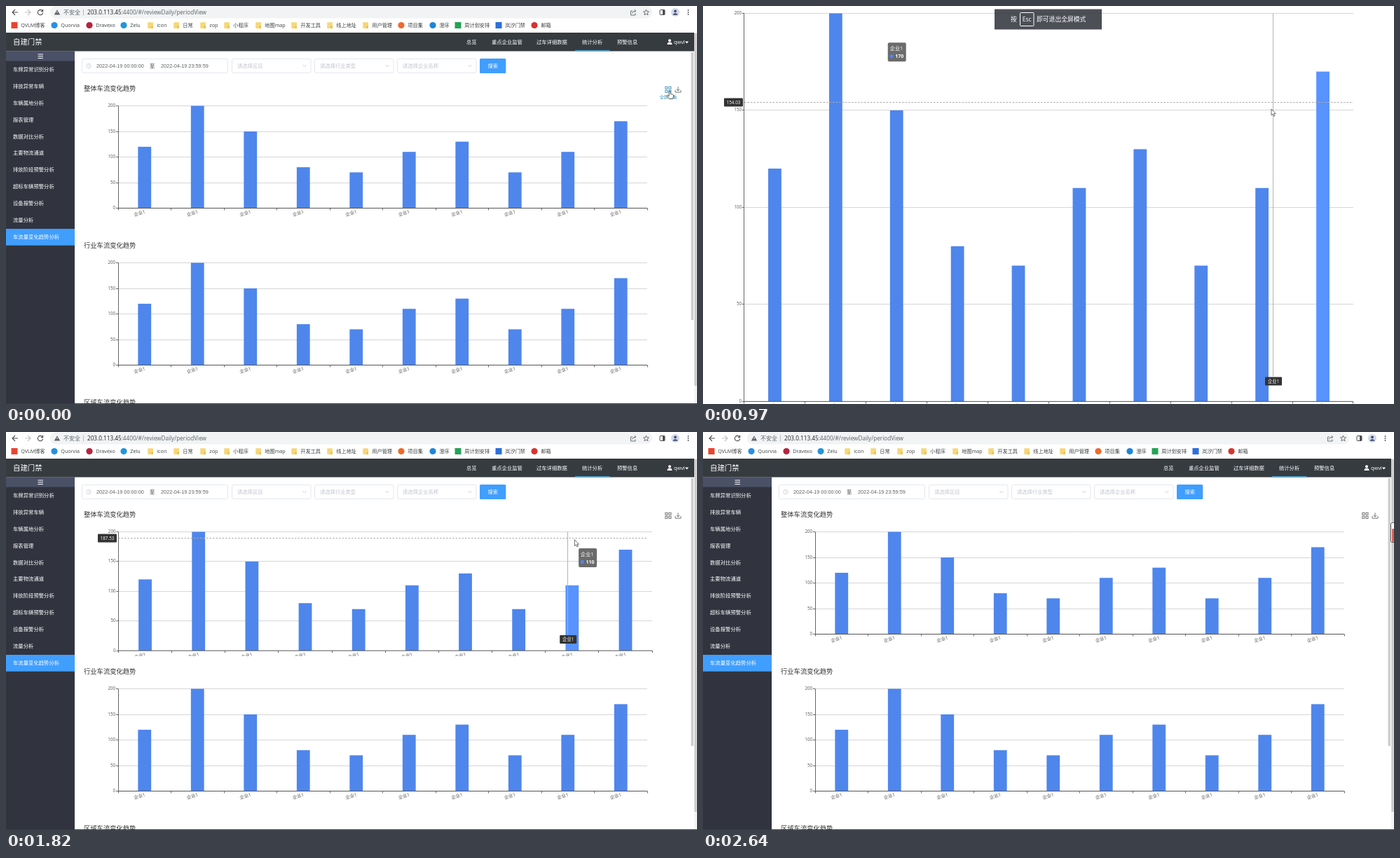
Animation, 986 px wide and 568 px high, one loop 3.04 s. Source, as an HTML page with a canvas:

```html
<!DOCTYPE html>
<html lang="zh">
<head>
<meta charset="utf-8">
<title>车流量变化趋势</title>
<style>
html, body { margin: 0; width: 100%; height: 100%; overflow: hidden; background: #fff; }
canvas { display: block; width: 986px; height: 568px; }
</style>
</head>
<body>
<canvas id="stage" width="986" height="568"></canvas>
<script>
const ctx = document.getElementById('stage').getContext('2d', { alpha: false });
const UI = '"Open Sans", "Noto Sans CJK SC", "Noto Sans CJK", sans-serif';
const INPUT = '"Liberation Sans", "Noto Sans CJK SC", sans-serif';
const BLUE = '#409eff', TAU = Math.PI * 2;

// Timeline in ms
const LOOP = 3040, ENTER = 690, HOVER = 900, EXIT = 1460, SHRINK = 1636, LEAVE = 2310, GONE = 2480;

const VALUES = [120, 200, 150, 80, 70, 110, 130, 70, 110, 170];
const MENU = ['车牌异常识别分析', '排放异常车辆', '车辆属地分析', '报表管理', '数据对比分析', '主要物流通道',
  '排放阶段预警分析', '超标车辆预警分析', '设备报警分析', '流量分析', '车流量变化趋势分析'];
const NAV = [[657, '总览'], [693, '重点企业监管'], [757, '过车详细数据'], [822, '统计分析'], [872, '预警信息']];
const BOOKMARKS = [
  [12, 'QVLM博客', 'square', '#e8452f'], [69, 'Quorvia', 'circle', '#2a8fe0'],
  [119, 'Dravexo', 'circle', '#b3243d'], [168, 'Zelu', 'circle', '#2196d8'],
  [206, 'icon'], [243, '日常'], [281, 'zop'], [315, '小程序'], [360, '地图map'],
  [411, '开发工具'], [462, '线上地址'], [513, '用户管理'],
  [564, '项目集', 'circle', '#ee6a2c'], [609, '澄序', 'circle', '#1d86d8'],
  [645, '周计划安排', 'square', '#23a455'], [703, '岚汐门禁', 'square', '#2c6fe0'],
  [754, '邮箱', 'circle', '#d5342f']];

const clamp = u => Math.min(1, Math.max(0, u));
const mix = (a, b, u) => a + (b - a) * u;
const outPow = (u, n) => 1 - (1 - clamp(u)) ** n;
const outExpo = u => u >= 1 ? 1 : 1 - 2 ** (-10 * clamp(u));

// Linear keyframes: [time, ...values]
function track(t, keys) {
  if (t <= keys[0][0]) return keys[0].slice(1);
  for (let i = 1; i < keys.length; i++) {
    const a = keys[i - 1], b = keys[i];
    if (t <= b[0]) return a.slice(1).map((v, k) => mix(v, b[k + 1], (t - a[0]) / (b[0] - a[0])));
  }
  return keys[keys.length - 1].slice(1);
}

// Drawing helpers; text is centred vertically on y
function text(s, x, y, size, color, align = 'left', font = UI, weight = '') {
  ctx.font = `${weight} ${size}px ${font}`;
  ctx.textAlign = align;
  ctx.fillStyle = color;
  ctx.fillText(s, x, y + size * 0.36);
}
function rect(x, y, w, h, color) {
  ctx.fillStyle = color;
  ctx.fillRect(x, y, w, h);
}
function round(x, y, w, h, r, fill, stroke) {
  ctx.beginPath();
  ctx.roundRect(x, y, w, h, r);
  if (fill) { ctx.fillStyle = fill; ctx.fill(); }
  if (stroke) { ctx.strokeStyle = stroke; ctx.lineWidth = 1; ctx.stroke(); }
}
function disc(x, y, r, color) {
  ctx.beginPath();
  ctx.arc(x, y, r, 0, TAU);
  ctx.fillStyle = color;
  ctx.fill();
}
function path(d, x, y, stroke, width = 1, fill) {
  ctx.save();
  ctx.translate(x, y);
  const p = new Path2D(d);
  if (fill) { ctx.fillStyle = fill; ctx.fill(p); }
  if (stroke) { ctx.strokeStyle = stroke; ctx.lineWidth = width; ctx.stroke(p); }
  ctx.restore();
}
const line = (x1, y1, x2, y2, color, width = 1) => path(`M${x1} ${y1}L${x2} ${y2}`, 0, 0, color, width);

function browserBar() {
  rect(0, 0, 986, 38, '#fff');
  path('M4 0H-4M0-4L-4 0L0 4', 13, 9, '#4a4d51', 1.1);
  path('M-4 0H4M0-4L4 0L0 4', 31, 9, '#bfc1c4', 1.1);
  path('M2.8-2.4A3.7 3.7 0 1 0 3.7.6M3.6-4.2V-1.4H.8', 49, 9, '#4a4d51', 1.1);
  round(63, 0.5, 859, 17, 8.5, '#f1f3f4');
  path('M0-3.8L4.2 3.6H-4.2Z', 73, 9, null, 1, '#5f6368');
  rect(72.6, 7.6, 0.9, 2.4, '#fff');
  text('不安全', 82, 9, 8, '#5f6368');
  rect(110, 4.5, 1, 9, '#b8bbbe');
  const host = '203.0.113.45';
  text(host, 116, 9, 8.2, '#202124');
  text(':4400/#/reviewDaily/periodView', 116 + ctx.measureText(host).width, 9, 8.2, '#5f6368');
  path('M-1-2H-3.5V4H3V1.5M-1.5 1.5Q-1-2 3.5-2M1.7-4L3.8-2L1.7 0', 895, 9, '#5f6368', 0.9);
  path('M0-4L1.1-1.2L4-1L1.8.9L2.5 3.8L0 2.2L-2.5 3.8L-1.8.9L-4-1L-1.1-1.2Z', 913.5, 9, '#5f6368', 0.9);
  round(933, 5.5, 7, 7, 1, '#fff', '#4a4d51');
  rect(937, 5.5, 3, 7, '#4a4d51');
  disc(955, 9, 6, '#d3d9ea');
  disc(955, 7.3, 1.9, '#3f4a6b');
  path('M-3.3 0Q-3-2.6 0-2.6Q3-2.6 3.3 0Z', 955, 12.8, null, 1, '#3f4a6b');
  for (const dy of [-3, 0, 3]) disc(973.5, 9 + dy, 0.9, '#4a4d51');

  for (const [x, label, shape, color] of BOOKMARKS) {
    if (shape === 'circle') disc(x, 27.5, 4.6, color);
    else if (shape === 'square') rect(x - 4.5, 23, 9, 9, color);
    else {
      round(x - 3.8, 23.2, 7.8, 8.8, 1, '#f7d777');
      rect(x + 1.2, 28.5, 2.8, 3.5, '#efc24f');
    }
    text(label, x + 9.3, 27.8, 7.2, '#3c4043');
  }
}

function shell(hover) {
  rect(0, 38, 982, 26.5, '#363b40');
  text('自建门禁', 10, 51, 10.4, '#fff');
  for (const [x, label] of NAV) text(label, x, 51.3, 7.3, '#fff');
  rect(812, 63, 49.5, 1.5, '#4fa3cf');
  disc(947, 49.2, 2, '#fff');
  path('M-3.5 0Q-3.5-3.6 0-3.6Q3.5-3.6 3.5 0Z', 947, 55, null, 1, '#fff');
  text('qwvl', 953, 51.3, 7.3, '#fff');
  path('M-2.6-1.4H2.6L0 1.6Z', 971.5, 51.8, null, 1, '#fff');

  rect(0, 64.5, 98, 504, '#31343f');
  rect(0, 65, 98, 13.5, '#4a5066');
  for (const dy of [-2.8, 0, 2.8]) rect(45.5, 71.2 + dy, 7.5, 1, '#fff');
  rect(0, 318, 98, 23.7, BLUE);
  MENU.forEach((label, i) => text(label, 10, 90.2 + 23.93 * i, 7.35, '#fff'));

  round(108.5, 75.5, 208, 20, 2, '#fff', '#e4e7ed');
  path('M3.2 0A3.2 3.2 0 1 1-3.2 0A3.2 3.2 0 1 1 3.2 0M0-2V.4H1.8', 118, 85.5, '#c0c4cc', 0.7);
  text('2022-04-19 00:00:00', 129, 85.2, 7.3, '#606266', 'left', INPUT);
  text('至', 205, 85.2, 7.3, '#303133');
  text('2022-04-19 23:59:59', 221, 85.2, 7.3, '#606266', 'left', INPUT);
  [[322, '请选择区目'], [440, '请选择行业类型'], [558, '请选择企业名称']].forEach(([x, label]) => {
    round(x + 0.5, 75.5, 112.5, 20, 2, '#fff', '#e4e7ed');
    text(label, x + 8, 85.2, 7.3, '#c0c4cc');
    path('M-2.7-1.3L0 1.4L2.7-1.3', x + 104, 85.3, '#c0c4cc', 0.8);
  });
  round(676, 75, 37.3, 21, 1.5, BLUE);
  text('搜索', 694.7, 85.2, 7.3, '#fff', 'center');

  ['整体车流变化趋势', '行业车流变化趋势', '区域车流变化趋势'].forEach((title, i) =>
    text(title, 111, 118 + 223.6 * i, 9.3, '#333'));

  const tone = hover ? '#3c8fb8' : '#666';
  for (const dx of [-4.2, 0.9]) for (const dy of [-4.2, 0.9]) {
    ctx.strokeStyle = tone;
    ctx.lineWidth = 0.9;
    ctx.strokeRect(945 + dx, 119.3 + dy, 3.1, 3.1);
  }
  path('M0-4V1.8M-2.3-.5L0 1.8L2.3-.5M-4 .8V3.8H4V.8', 959, 119.3, '#666', 0.9);
  if (hover) text('全屏查看', 945, 129.5, 6.2, tone, 'center');

  rect(977.5, 66, 3.5, 382, '#cdcdcd');
  rect(982, 38, 4, 530, '#f4f4f4');
  rect(982.3, 39, 3.4, 503, '#cbcbcb');
  rect(0, 567, 986, 1, '#3a3a3a');
}

// Chart in its container's coordinates
function chart(grid, active = -1) {
  const { left, width, top, height } = grid;
  const base = top + height, pitch = width / VALUES.length;
  for (let v = 0; v <= 200; v += 50) {
    const y = Math.round(base - v / 200 * height - 0.5) + 0.5;
    if (v) line(left, y, left + width, y, '#d6d6d6');
    line(left - 3, y, left, y, '#666');
    text(v, left - 4, y - 0.4, 6.2, '#555', 'right');
  }
  VALUES.forEach((v, i) => {
    const x = left + pitch * (i + 0.5), h = v / 200 * height;
    rect(x - 9.4, base - h, 18.8, h, i === active ? '#5893ff' : '#4f86ec');
    ctx.save();
    ctx.translate(x + 0.5, base + 4.6);
    ctx.rotate(-0.3);
    text('企业1', 0, 0, 6.4, '#555', 'right');
    ctx.restore();
  });
  const axisX = Math.round(left - 0.5) + 0.5;
  line(axisX, top, axisX, base + 3, '#666');
  line(left, base, left + width, base, '#555');
  for (let i = 1; i <= VALUES.length; i++) {
    const x = Math.round(left + pitch * i - 0.5) + 0.5;
    line(x, base, x, base + 3, '#666');
  }
}
const mainGrid = f => ({ left: 51 + 8 * f, width: 755 + 114 * f, top: 10.5, height: 146 + 408 * f });

function badge(s, x, y, w) {
  round(x, y, w, 12, 1, '#333');
  text(s, x + w / 2, y + 5.8, 6.3, '#fff', 'center');
}

function pointerState(t) {
  if (t < HOVER || t >= LEAVE) return null;
  if (t < SHRINK) {
    const p = outExpo((t - HOVER) / 200), q = outPow((t - 940) / 400, 5);
    return {
      grid: mainGrid(1), active: 9, x: mix(87, 884, p), bottom: mix(156.5, 564.5, p),
      y: track(t, [[970, 137.834], [1250, 147]])[0],
      tip: t >= 940 && [817 * q, 162 * q]
    };
  }
  const p = outExpo((t - 1632) / 200), q = outPow((t - 1635) / 400, 5);
  const [tx, ty] = track(t, [[2030, 812, 160], [2070, 815, 162], [2200, 838, 170]]);
  return {
    grid: mainGrid(0), active: 8, x: mix(884, 692.4, p), bottom: mix(564.5, 156.5, p),
    y: track(t, [[1660, 16.756], [2070, 24.056]])[0],
    tip: [mix(926, tx, q) - 109, mix(294, ty, q) - 132]
  };
}

function crosshair({ grid, x, y, bottom }) {
  const { left, width, top, height } = grid;
  const rowY = Math.round(y - 0.5) + 0.5, colX = Math.round(x - 0.5) + 0.5;
  line(colX, top, colX, bottom, '#b2b2b2');
  ctx.setLineDash([2.5, 2]);
  line(left, rowY, left + width, rowY, '#aaa');
  ctx.setLineDash([]);
  badge((200 - (y - top) / height * 200).toFixed(2), left - 29, rowY - 6, 27);
  badge('企业1', x - 11.5, bottom + 1, 24);
}

function tooltip([x, y], value) {
  round(x, y, 26, 27, 2, 'rgba(50,50,50,.72)');
  text('企业1', x + 3, y + 8, 7.2, '#fff');
  disc(x + 5.3, y + 19.3, 2.6, '#4f86ec');
  text(value, x + 10.5, y + 19.2, 7, '#fff', 'left', UI, 'bold');
}

function toast(t) {
  const u = clamp((t - ENTER) / 140);
  if (!u) return;
  ctx.save();
  ctx.translate(492.5, 19);
  ctx.scale(mix(0.96, 1, u), mix(0.96, 1, u));
  rect(-76.5, -14.5, 153, 29, `rgba(32,36,44,${0.8 * u})`);
  text('按', -53.5, 0.3, 8.8, '#fff');
  round(-40, -9.5, 19.5, 19, 1, null, '#fff');
  text('Esc', -30.3, 0.3, 8.6, '#fff', 'center');
  text('即可退出全屏模式', -16.5, 0.3, 8.8, '#fff');
  ctx.restore();
}

function cursor(t) {
  if (t >= GONE) return;
  const [x, y] = track(t, [[650, 947, 121], [790, 947, 121], [970, 811, 147], [1460, 802, 150],
    [1680, 802, 150], [2070, 828, 160], [2270, 900, 300], [2470, 985, 562]]);
  if (t < 650 || (t >= ENTER && t < 800))
    path('M-1 1Q0-.6 1 1V4.5L4.5 5.3Q5.7 5.7 5.5 7L4.6 11.5H-.6L-3.7 7.6Q-3.5 6.2-2.2 6.9L-1 7.8Z', x, y, '#333', 0.8, '#fff');
  else
    path('M0 0V9L2.1 7.2L3.5 10.3L5 9.6L3.6 6.6H6.2Z', t < ENTER ? x - 3 : x, y, '#333', 0.7, '#fff');
}

function sideWidget() {
  round(981.5, 129.5, 9, 28, 2, '#fff', '#555');
  rect(983, 138, 3, 19, '#e5736e');
  rect(984, 139, 1, 17, '#c93a35');
}

function draw(t) {
  const full = t >= ENTER && t < EXIT;
  const pointer = pointerState(t);
  const grow = t < SHRINK ? outPow((t - ENTER) / 300, 3) : 1 - outPow((t - SHRINK) / 300, 3);
  rect(0, 0, 986, 568, '#fff');
  if (!full) {
    browserBar();
    shell(t < ENTER);
    const wide = t < EXIT ? 0 : 1 - outPow((t - EXIT) / 300, 3);
    ctx.save();
    ctx.beginPath();
    ctx.rect(109, 356, 857.5, 188);
    ctx.clip();
    ctx.translate(109, 356);
    chart({ left: 51, width: 755 + 114 * wide, top: 10.5, height: 146 });
    ctx.restore();
  }
  ctx.save();
  if (!full) ctx.translate(109, 132);
  ctx.save();
  if (!full) {
    ctx.beginPath();
    ctx.rect(0, 0, 857.5, 188);
    ctx.clip();
  }
  chart(mainGrid(grow), pointer ? pointer.active : -1);
  if (pointer) crosshair(pointer);
  ctx.restore();
  if (pointer && pointer.tip) tooltip(pointer.tip, VALUES[pointer.active]);
  ctx.restore();
  if (full) toast(t);
  if (t >= 1940) sideWidget();
  cursor(t);
}

function step(t) {
  if (t < 650) return 0;
  const base = t < 1060 ? 650 : t < 1910 ? 1060 : 1910;
  return base + 40 * Math.floor((t - base) / 40);
}

const start = performance.now();
let shown = -1;
function tick() {
  const t = step((performance.now() - start) % LOOP);
  if (t !== shown) draw(shown = t);
  requestAnimationFrame(tick);
}
tick();
</script>
</body>
</html>
```
